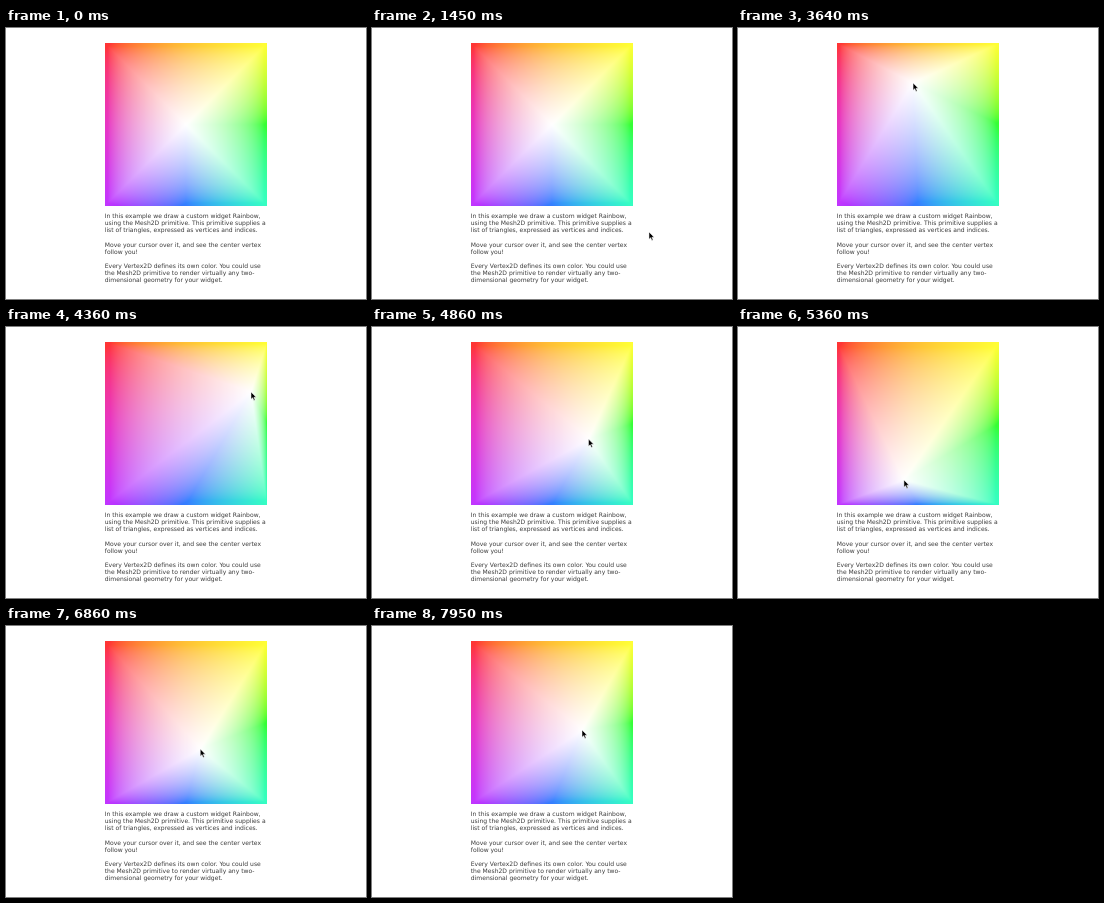
Recreate the animation shown at these times as an HTML page with a canvas. Size 360x271 px, loop 8000 ms.

```html
<!DOCTYPE html>
<html lang="en">
<head>
<meta charset="utf-8">
<style>
html, body { margin: 0; width: 100%; height: 100%; overflow: hidden; background: #fff; }
canvas, svg { position: absolute; left: 0; top: 0; }
text { font: 6.06px "DejaVu Sans", sans-serif; fill: #3a3a3a; text-rendering: geometricPrecision; }
</style>
</head>
<body>
<canvas id="stage" width="360" height="271"></canvas>
<svg width="360" height="271">
  <g id="copy"></g>
  <path id="cursor" d="M0 0V7.2L1.7 5.7 2.9 8.5 4.1 8 2.9 5.2H5.2Z" stroke="#fff" stroke-width=".5"/>
</svg>
<script>
const LOOP = 8000, LEFT = 98.75, TOP = 15.2, SIZE = 162.5, CELLS = 162;

const copy = `In this example we draw a custom widget Rainbow,
using the Mesh2D primitive. This primitive supplies a
list of triangles, expressed as vertices and indices.

Move your cursor over it, and see the center vertex
follow you!

Every Vertex2D defines its own color. You could use
the Mesh2D primitive to render virtually any two-
dimensional geometry for your widget.`;
document.getElementById('copy').innerHTML = copy.split('\n').map((line, i) =>
  `<text x="${LEFT}" y="${190.2 + i * 7.09}">${line}</text>`).join('');

// Edge vertices in linear light, clockwise from the top left
const rim = 'f00 f80 ff0 0f0 0f8 03f 80f c08'.split(' ')
  .map(hex => [...hex].map(digit => parseInt(digit, 16) / 15));

// Linear light to sRGB bytes; the floor keeps the edges slightly soft
const FLOOR = .035;
const gamma = Array.from({ length: 1025 }, (_, i) =>
  255 * (1.055 * Math.max(i / 1024, FLOOR) ** (1 / 2.4) - .055));

// Turning points of the pointer: time, x, y
const path = [
  [450, 349, 266], [680, 287, 204], [1450, 277, 204], [2250, 110, 178],
  [2910, 128, 145], [3640, 175, 55], [4360, 245, 65], [5360, 166, 153],
  [6390, 62, 118], [6860, 194, 123], [7300, 307, 113], [7950, 210, 104]
];

const rate = (i, c) => path[i] && path[i + 1]
  ? (path[i + 1][c] - path[i][c]) / (path[i + 1][0] - path[i][0]) : 0;

// Harmonic mean keeps each coordinate free of overshoot
function slope(i, c) {
  const a = rate(i - 1, c), b = rate(i, c);
  return a * b > 0 ? 2 * a * b / (a + b) : 0;
}

function pointer(time) {
  if (time < path[0][0]) return null;
  const t = Math.min(time, path.at(-1)[0]);
  const i = path.findIndex((_, n) => t <= path[n + 1][0]);
  const p = path[i], q = path[i + 1], d = q[0] - p[0], u = (t - p[0]) / d;
  return [1, 2].map(c =>
    p[c] + (q[c] - p[c]) * u * u * (3 - 2 * u)
    + d * u * (1 - u) * ((1 - u) * slope(i, c) - u * slope(i + 1, c)));
}

const ctx = document.getElementById('stage').getContext('2d');
const mesh = document.createElement('canvas');
mesh.width = mesh.height = CELLS;
const meshCtx = mesh.getContext('2d');
const img = meshCtx.createImageData(CELLS, CELLS);
const cursor = document.getElementById('cursor');

// Triangle fan around a white vertex at (cx, cy), in unit coordinates
function drawMesh(cx, cy) {
  let o = 0;
  for (let row = 0; row < CELLS; row++) for (let col = 0; col < CELLS; col++) {
    const dx = (col + .5) / CELLS - cx, dy = (row + .5) / CELLS - cy;
    const kx = dx > 0 ? dx / (1 - cx) : -dx / cx;
    const ky = dy > 0 ? dy / (1 - cy) : -dy / cy;
    const k = Math.max(kx, ky, 1e-6);
    const ex = cx + dx / k, ey = cy + dy / k;
    const pos = kx > ky ? (dx > 0 ? 2 + 2 * ey : 8 - 2 * ey)
                        : (dy > 0 ? 6 - 2 * ex : 2 * ex);
    const n = Math.floor(pos), f = pos - n;
    const a = rim[(n + 8) % 8], b = rim[(n + 9) % 8];
    for (let c = 0; c < 3; c++) {
      const v = 1 - k + k * (a[c] + (b[c] - a[c]) * f);
      img.data[o++] = gamma[Math.round(Math.min(Math.max(v, 0), 1) * 1024)];
    }
    img.data[o++] = 255;
  }
  meshCtx.putImageData(img, 0, 0);
  ctx.clearRect(0, 0, 360, 271);
  ctx.drawImage(mesh, LEFT, TOP, SIZE, SIZE);
}

function frame() {
  const at = pointer(performance.now() % LOOP);
  let center = [.5, .5];
  cursor.style.display = at ? '' : 'none';
  if (at) {
    cursor.setAttribute('transform', `translate(${at})`);
    const spot = [(at[0] - LEFT) / SIZE, (at[1] - TOP) / SIZE];
    if (spot.every(v => v > 0 && v < 1)) center = spot;
  }
  drawMesh(...center);
  requestAnimationFrame(frame);
}
frame();
</script>
</body>
</html>
```
